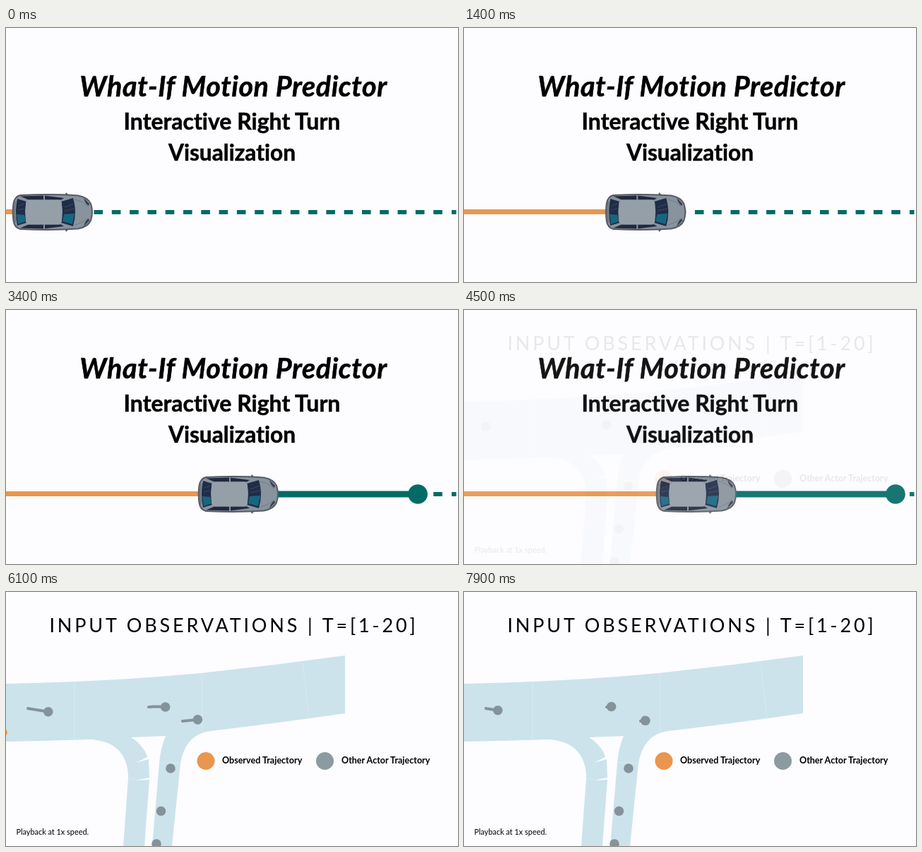
Write an HTML page that moves like this. It is 640x360 px and loops after 8 s.

```html
<!DOCTYPE html>
<html lang="en">
<head>
<meta charset="utf-8">
<title>Right turn visualization</title>
<style>
  html, body { margin: 0; width: 100%; height: 100%; overflow: hidden; background: #fdfcfe; }
  svg { display: block; width: 640px; height: 360px; font-family: Lato, "Open Sans", sans-serif; font-variant-ligatures: none; }
  .heading { font-weight: 700; text-anchor: middle; stroke: #000; stroke-width: .5; }
  .legend { font-weight: 700; font-size: 12.55px; }
  .trail { fill: none; stroke-width: 4; stroke-linecap: round; stroke-linejoin: round; }
</style>
</head>
<body>
<svg viewBox="0 0 640 360">
  <g id="scene">
    <rect width="640" height="360" fill="#fdfcfe"/>
    <path fill="#cce3ec" d="M0 130Q50 129 97 127Q190 123 280 114.5Q380 104 480 90V172
      Q390 185 290 197C264 200 251 218 247 243L235 360H207L217 243Q219 220 226 204L177 206
      C192 215 199 228 200 234L184 242L202 237L203 263L184 267L203 266L196 360H166
      L173 265C174 232 156 211 120 209Q60 211 0 212Z"/>
    <path fill="none" stroke="#d9eaf1" d="M97 128V209M277 115L278 198M420 99L429 180M174 265H184M217 242H246"/>
    <g id="actors"></g>
    <text x="322.500" y="57" font-size="27" letter-spacing="3.850" text-anchor="middle">INPUT OBSERVATIONS | T=[1-20]</text>
    <circle cx="283" cy="239.500" r="12.500" fill="#e9964f"/>
    <text class="legend" x="306" y="243">Observed Trajectory</text>
    <circle cx="451.500" cy="239.500" r="12.500" fill="#8c9ba1"/>
    <text class="legend" x="475" y="243">Other Actor Trajectory</text>
    <text x="14.500" y="344" font-size="10.900">Playback at 1x speed.</text>
  </g>

  <g id="intro">
    <rect width="640" height="360" fill="#fdfcfe"/>
    <g class="heading">
      <text x="322" y="97" font-size="39.500" font-style="italic" letter-spacing=".55">What-If Motion Predictor</text>
      <text x="320" y="144" font-size="32">Interactive Right Turn</text>
      <text x="320" y="188" font-size="31.700">Visualization</text>
    </g>
    <path id="dashes" stroke="#036b66" stroke-width="6"/>
    <path id="future" stroke="#036b66" stroke-width="9"/>
    <circle id="goal" cy="261" r="13.800" fill="#036b66"/>
    <path id="past" stroke="#e9964f" stroke-width="7"/>
    <g id="car">
      <path fill="#56606c" d="M17-23L19-28L23-24ZM17 23L19 28L23 24Z"/>
      <path fill="#89939d" stroke="#555b67" stroke-width="2" d="M-46-24Q0-26 36-23.500Q50-21 54-12Q58 0 54 12Q50 21 36 23.500Q0 26-46 24Q-54 22-55.500 12Q-57 0-55.500-12Q-54-22-46-24Z"/>
      <path fill="none" stroke="#69727d" stroke-width="2" d="M-53-15Q-55 0-53 15"/>
      <path fill="#20293d" d="M-46-22.500L-12-23.500L16-20L12-17.500H-34ZM-46 22.500L-12 23.500L16 20L12 17.500H-34Z"/>
      <path fill="#1f2d48" d="M-50-19L-37-15Q-41 0-37 15L-50 19Q-54 0-50-19ZM12-15L29-20Q35 0 29 20L12 15Q16 0 12-15Z"/>
      <path fill="#176680" d="M-51 3L-40 4L-38 13L-49 17ZM16 3L31 2L28 17L14 13Z"/>
      <path fill="none" stroke="#3d4a5c" d="M-48-9L-40-12M-49-3L-41-5M17-7L30-12M17-2L31-5"/>
      <rect x="-38" y="-17.500" width="51" height="35" rx="5" fill="#959fa8"/>
      <path fill="none" stroke="#89939d" stroke-width="2" d="M-12-24V-17M-12 24V17"/>
      <path fill="none" stroke="#737d88" d="M31-18Q44-15 50-8M31 18Q44 15 50 8"/>
      <path fill="#39424f" d="M44-20L52-12L51-9Q46-12 44-20ZM44 20L52 12L51 9Q46 12 44 20Z"/>
    </g>
  </g>
</svg>
<script>
const LOOP = 8000, CAR_END = 329, CLIP = 2150;
const GRAY = "#84939a", ORANGE = "#e9964f";
const $ = id => document.getElementById(id);
const clamp = x => Math.max(0, Math.min(1, x));
const span = (t, a, b) => clamp((t - a) / (b - a));
const ease = u => u < .5 ? 2 * u * u : 1 - 2 * (1 - u) ** 2;

// Dashes are anchored at the right: a short first one, then a steady rhythm.
let dashes = "M631 261H637.5";
for (let x = 605.2; x > -13; x -= 25.3) dashes += `M${x} 261h12.6`;
$("dashes").setAttribute("d", dashes);

// Each path gives a position after e seconds of the clip.
const progress = (e, power) => (e / 2.1) ** power;
const actors = [
  [GRAY, e => { const q = progress(e, .77); return [31 + 67 * q, 165 + 11 * q]; }],
  [GRAY, e => { const q = progress(e, 1.83); return [202 + 176 * q, 163 - .6 * Math.sin(Math.PI * clamp(q * 8)) - 20 * q ** 3]; }],
  [GRAY, e => { const q = progress(e, 1.65); return [250 + 131 * q, 183 - 13 * q]; }],
  [ORANGE, e => [57 * e - 45, 199 + .5 * e * e]],
  [GRAY, () => [233, 250]],
  [GRAY, () => [219.5, 310.5]],
  [GRAY, () => [213, 357]]
].map(([color, at]) => {
  const add = (tag, attrs) => {
    const el = document.createElementNS("http://www.w3.org/2000/svg", tag);
    for (const k in attrs) el.setAttribute(k, attrs[k]);
    return $("actors").appendChild(el);
  };
  return {
    at,
    trail: add("polyline", { class: "trail", stroke: color }),
    dot: add("circle", { r: 6.8, fill: color })
  };
});

function draw(t) {
  const carX = 66 + (CAR_END - 66) * ease(span(t, 463, 1950));
  const goalX = CAR_END + (611 - CAR_END) * ease(span(t, 2600, 3630));
  $("car").setAttribute("transform", `translate(${carX} 261)`);
  $("past").setAttribute("d", `M0 260.5H${carX}`);
  $("future").setAttribute("d", `M${CAR_END} 261H${goalX}`);
  $("future").style.display = $("goal").style.display = t < 2600 ? "none" : "";
  $("goal").setAttribute("cx", goalX);
  $("intro").setAttribute("opacity", 1 - span(t, 4400, 5650));

  const e = Math.max(0, t - 5400) % CLIP / 1000;
  for (const { at, trail, dot } of actors) {
    const [x, y] = at(e);
    dot.setAttribute("cx", x);
    dot.setAttribute("cy", y);
    trail.setAttribute("points", Array.from({ length: 25 }, (_, i) => at(e * i / 24)).join(" "));
  }
}

const start = performance.now();
function tick() {
  draw((performance.now() - start) % LOOP);
  requestAnimationFrame(tick);
}
tick();
</script>
</body>
</html>
```
